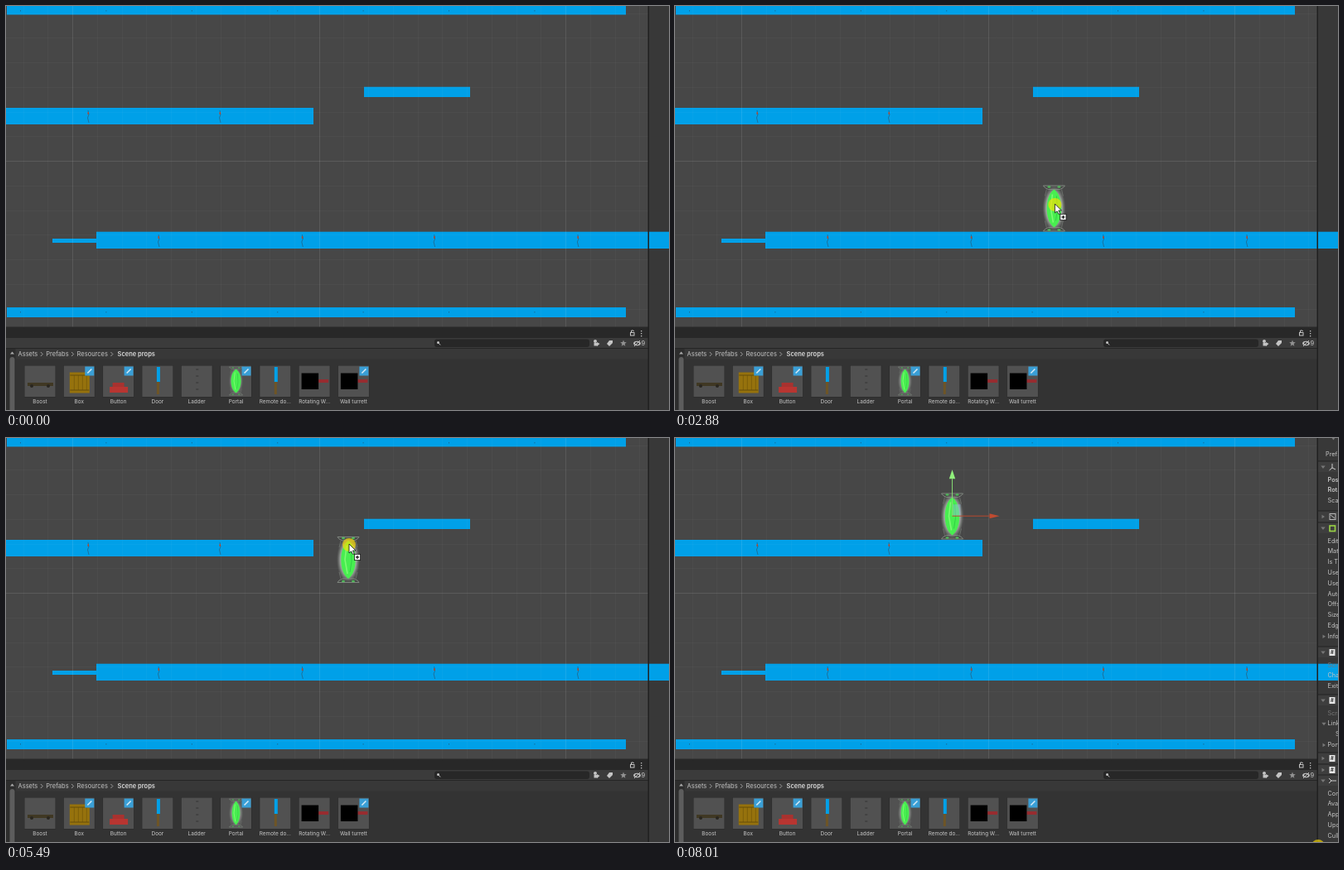
An HTML page with a canvas that plays this animation: 800 by 488 pixels, repeating every 8.09 s.

```html
<!DOCTYPE html>
<html>
<head>
<meta charset="utf-8">
<style>
html, body { margin: 0; width: 100%; height: 100%; overflow: hidden; background: #383838; }
canvas { display: block; }
</style>
</head>
<body>
<canvas id="stage" width="800" height="488"></canvas>
<script>
const ctx = document.getElementById('stage').getContext('2d');
const LOOP = 8090, TICK = 78, DRAG = 850, DROP = 6920;
const CELL = 29.75, SCENE_W = 775, SCENE_H = 388, FLOOR = 244.5;
const BLUE = '#00a0e8', LIGHT = '#c4c4c4';

// Mouse strokes: start and end time, where the cursor arrives, height of the dragged portal.
const START = { x: 675, y: 500, portalY: 500 };
const STROKES = [
  { from: 70, to: 700, x: 283, y: 455 },
  { from: DRAG, to: 1640, x: 323, y: 239, portalY: FLOOR },
  { from: 1710, to: 1790, x: 329, y: 220, portalY: 223 },
  { from: 1940, to: 2100, x: 339, y: 240, portalY: FLOOR },
  { from: 2490, to: 3200, x: 538, y: 240, portalY: FLOOR },
  { from: 3350, to: 3670, x: 488, y: 240, portalY: FLOOR },
  { from: 3820, to: 4380, x: 472, y: 171, portalY: 169 },
  { from: 4460, to: 4620, x: 452, y: 186, portalY: 188 },
  { from: 4700, to: 5090, x: 440, y: 239, portalY: FLOOR },
  { from: 5250, to: 5490, x: 414, y: 129, portalY: 147 },
  { from: 5570, to: 6050, x: 351, y: 56, portalY: 58 },
  { from: 6130, to: 6610, x: 336, y: 93, portalY: 94.5 },
  { from: DROP, to: 7700, x: 776, y: 510 },
  { from: 8010, to: 8010, x: 776, y: 493 }
];

// Each stroke advances in even steps, about one per TICK.
function pose(time) {
  let now = START;
  for (const { from, to, x, y, portalY = y } of STROKES) {
    if (time < from) break;
    const steps = Math.round((to - from) / TICK) + 1;
    const done = Math.floor(1.15 + (time - from) * (steps - 1) / (to - from || 1));
    const p = Math.min(1, done / steps);
    const mix = (a, b) => a + (b - a) * p;
    now = { x: mix(now.x, x), y: mix(now.y, y), portalY: mix(now.portalY, portalY) };
  }
  return now;
}

function rect(x, y, w, h, color) {
  ctx.fillStyle = color;
  ctx.fillRect(x, y, w, h);
}

function frame(x, y, w, h, color, width = 1) {
  ctx.strokeStyle = color;
  ctx.lineWidth = width;
  ctx.strokeRect(x, y, w, h);
}

function pill(x, y, w, h, color) {
  ctx.beginPath();
  ctx.roundRect(x, y, w, h, 3);
  ctx.fillStyle = color;
  ctx.fill();
}

function trace(points) {
  ctx.beginPath();
  for (let i = 0; i < points.length; i += 2) ctx.lineTo(points[i], points[i + 1]);
}

function line(color, width, ...points) {
  trace(points);
  ctx.strokeStyle = color;
  ctx.lineWidth = width;
  ctx.stroke();
}

function poly(color, ...points) {
  trace(points);
  ctx.closePath();
  ctx.fillStyle = color;
  ctx.fill();
}

function ellipse(x, y, rx, ry, color) {
  ctx.beginPath();
  ctx.ellipse(x, y, rx, ry, 0, 0, 7);
  ctx.fillStyle = color;
  ctx.fill();
}

function text(s, x, y, size, { color = LIGHT, weight = 400, align = 'left' } = {}) {
  ctx.font = `${weight} ${size}px Inter, sans-serif`;
  ctx.textAlign = align;
  ctx.textBaseline = 'middle';
  ctx.fillStyle = color;
  ctx.fillText(s, x, y);
}

function foldout(x, y, open) {
  if (open) poly('#777', x - 2.7, y - 1.5, x + 2.7, y - 1.5, x, y + 2);
  else poly('#777', x - 1.5, y - 2.3, x + 2, y, x - 1.5, y + 2.3);
}

function drawPortal(x, y, scale = 1, width = 9, glow = .9) {
  ctx.save();
  ctx.translate(x, y);
  ctx.scale(scale, scale);

  ctx.save();
  ctx.scale(.5, 1);
  const halo = ctx.createRadialGradient(0, 0, 12, 0, 0, 28);
  halo.addColorStop(0, `rgba(225,240,225,${glow})`);
  halo.addColorStop(.5, `rgba(200,212,200,${glow * .65})`);
  halo.addColorStop(1, 'rgba(150,150,150,0)');
  ellipse(0, 0, 28, 28, halo);
  ctx.restore();

  // Ornaments, mirrored to all four corners.
  for (const sy of [-1, 1]) for (const sx of [-1, 1]) {
    ctx.save();
    ctx.scale(sx, sy);
    line('#858d85', .9, 0, 27.5, 13, 27.5, 11, 25, 7, 23, 0, 23);
    line('#727872', .8, 9, 23, 11, 15);
    ellipse(6, 26, 2, 1.2, '#51b85a');
    ctx.restore();
  }

  const bulge = width * 1.3;
  ctx.beginPath();
  ctx.moveTo(0, -23);
  ctx.bezierCurveTo(bulge, -15, bulge, 15, 0, 23);
  ctx.bezierCurveTo(-bulge, 15, -bulge, -15, 0, -23);
  ctx.fillStyle = '#48ee50';
  ctx.fill();
  line('#7dfa72', 1.6, -2, -17, -4, 0, -1, 17);
  line('#2fd044', 1, 3, -15, 4, 2, 2, 15);
  ctx.restore();
}

function drawCrack(x, y) {
  line('#24658a', .8, x, y + 3, x + 1, y + 8, x - .5, y + 12, x + 1, y + 18);
  rect(x - .5, y + 5, 1.5, 3, '#a84a38');
}

function drawScene() {
  rect(0, 0, SCENE_W, SCENE_H, '#474747');
  for (const [y, h] of [[0, 10.5], [364, 12]]) {
    rect(1, y, 747, h, BLUE);
    for (let x = 17; x < 740; x += 103.4) rect(x, y + 5, 1, 1.5, '#176e9c');
  }
  rect(432, 97.7, 128, 12.3, BLUE);
  rect(56, 281, 53, 5, BLUE);
  rect(0, 123, 371, 20, BLUE);
  rect(109, 272.7, SCENE_W, 20.3, BLUE);
  for (let i = 0; i < 2; i++) drawCrack(99 + 159 * i, 123);
  for (let i = 0; i < 4; i++) drawCrack(184 + 166.3 * i + i % 2 * 7, 273);

  const shade = n => `rgba(255,255,255,${n % 10 ? .027 : .1})`;
  for (let n = -2; n < 24; n++) {
    const x = Math.round(80 + n * CELL) + .5;
    line(shade(n), 1, x, 0, x, SCENE_H);
  }
  for (let n = -6; n < 7; n++) {
    const y = Math.round(187 + n * CELL) + .5;
    line(shade(n), 1, 0, y, SCENE_W, y);
  }
}

function drawDoor(x) {
  rect(x - 1, 454, 3, 15, '#6e5526');
  rect(x - 1, 436, 4, 18, BLUE);
}

function drawTurret(x) {
  rect(x + 5, 451, 12, 4, '#972c30');
  rect(x - 15.5, 443.5, 20.5, 19.5, '#000');
}

const PROPS = {
  'Boost'(x) {
    rect(x - 15, 455, 31, 4, '#403823');
    for (const dx of [-10, 10]) ellipse(x + dx, 459, 2, 2, '#29261f');
  },
  'Box'(x) {
    rect(x - 11.5, 442.5, 24, 25, '#96720d');
    for (let dx = -6; dx < 10; dx += 5) line('#7c5e0b', 1, x + dx, 446, x + dx, 464);
    for (const y of [446, 464]) line('#654c08', 1, x - 11, y, x + 12, y);
  },
  'Button'(x) {
    rect(x - 7, 455, 14, 5, '#a8322f');
    rect(x - 10.5, 460, 22, 7, '#b83531');
  },
  'Door': drawDoor,
  'Ladder'(x) {
    for (let y = 438; y < 470; y += 8) rect(x - 1, y, 3, 2, '#424242');
  },
  'Portal'(x, time) {
    drawPortal(x, 453, .62, time < DRAG ? 10 : 8, .5);
  },
  'Remote do...': drawDoor,
  'Rotating W...': drawTurret,
  'Wall turrett': drawTurret
};
const EDITABLE = ['Box', 'Button', 'Portal', 'Wall turrett'];

function drawToolbarIcons() {
  frame(753.5, 394.5, 4.5, 3.5, LIGHT);
  line(LIGHT, 1, 754.5, 394, 754.5, 392, 757, 392, 757.5, 393);
  for (let y = 392; y < 400; y += 3) rect(766, y, 1.3, 1.3, LIGHT);
  ellipse(521.5, 406.5, 1.5, 1.5, LIGHT);
  line(LIGHT, 1, 522.5, 407.5, 524, 409.5);
  ellipse(711, 405, 2, 2, LIGHT);
  rect(709.5, 407, 4, 3.5, LIGHT);
  poly(LIGHT, 713, 406, 716.5, 408, 713, 411);
  poly(LIGHT, 725, 408, 728, 404, 732, 404, 732, 407, 728, 411);
  const star = [];
  for (let i = 0; i < 10; i++) {
    const r = i % 2 ? 1.7 : 4, a = i * Math.PI / 5;
    star.push(745 + r * Math.sin(a), 407.5 - r * Math.cos(a));
  }
  poly('#929292', ...star);
  ellipse(761.5, 407.5, 4.3, 2.8, LIGHT);
  ellipse(761.5, 407.5, 2.5, 1.7, '#3b3b3b');
  line(LIGHT, 1, 758, 411, 765, 404);
  text('9', 766.5, 408, 7.5);
}

function drawProject(time) {
  rect(0, 388, SCENE_W, 100, '#333');
  rect(0, 387.5, SCENE_W, 13.5, '#282828');
  rect(0, 401, SCENE_W, 12.5, '#3b3b3b');
  rect(0, 413, SCENE_W, 13.5, '#383838');
  rect(0, 413, SCENE_W, 1, '#252525');
  rect(0, 414, 11.5, 74, '#2d2d2d');
  poly('#aaa', 5, 420.5, 10, 420.5, 7.5, 417.5);
  pill(4.5, 424, 6, 80, '#5d5d5d');
  pill(517, 402.5, 187, 9.5, '#272727');
  drawToolbarIcons();

  let x = 14.5;
  for (const folder of ['Assets', 'Prefabs', 'Resources']) {
    text(folder, x, 420.5, 7.5);
    x += ctx.measureText(folder).width + 3.5;
    line('#aaa', .9, x, 418, x + 2.5, 420.5, x, 423);
    x += 6.5;
  }
  text('Scene props', 134.5, 420.5, 7.5, { color: '#d8d8d8', weight: 600 });

  Object.entries(PROPS).forEach(([name, drawProp], i) => {
    const x = 41 + i * 47.3;
    rect(x - 19, 434, 38, 38.5, '#2b2b2b');
    rect(x - 18.5, 434.5, 37, 37.5, '#515151');
    drawProp(x, time);
    if (EDITABLE.includes(name)) {
      rect(x + 7, 435.5, 11, 11, '#3a9fd6');
      line('#d5eaf5', 1.6, x + 10, 443.5, x + 15, 438.5);
    }
    text(name, x, 478.5, 6.4, { color: '#c8c8c8', align: 'center' });
  });
}

const HEADER_ICONS = {
  axes(y) {
    line('#ccc', 1, 793, y - 4, 793, y + 1, 797, y + 3);
    line('#ccc', 1, 793, y + 1, 789.5, y + 4);
  },
  sprite(y) {
    frame(790, y - 3.5, 7, 7, '#bbb');
    line('#bbb', 1, 791, y - 2, 796, y + 2);
  },
  collider(y) {
    frame(790, y - 3, 6.5, 6.5, '#9ad444', 1.6);
  },
  script(y) {
    rect(789.5, y - 4, 7, 8, '#e6e6e6');
    text('#', 793, y + .3, 6, { color: '#333', weight: 700, align: 'center' });
  },
  animator(y) {
    line('#ccc', 1, 789, y - 3, 792, y, 789, y + 3);
    line('#ccc', 1, 792, y, 798, y);
  }
};
const SECTIONS = [
  [35, 'axes', 'Position', 'Rotation', 'Scale'],
  [95, 'sprite'],
  [109, 'collider', 'Edit', 'Material', 'Is Trigger', 'Used', 'Used', 'Auto', 'Offset', 'Size', 'Edge', 'Info'],
  [259, 'script', 'Script', 'Channel', 'Exit'],
  [317, 'script', 'Script', 'Link', 'Size', 'Portal'],
  [387, 'script'],
  [401, 'script'],
  [414, 'animator', 'Controller', 'Avatar', 'Apply', 'Update', 'Culling']
];
const FOLDED = ['Info', 'Link', 'Portal'];

function drawInspector() {
  foldout(794.5, .5, true);
  text('Prefab', 785, 19.5, 7.3);
  for (const [top, icon, ...fields] of SECTIONS) {
    rect(776, top - 7, 24, 13, '#3e3e3e');
    rect(776, top - 7.5, 24, 1, '#222');
    foldout(782, top, fields.length > 0);
    HEADER_ICONS[icon](top);
    fields.forEach((name, i) => {
      const y = top + 15.5 + i * 12.8;
      const nested = icon === 'script' && name === 'Size';
      const bold = name === 'Position' || name === 'Rotation';
      text(name, nested ? 797 : 787.5, y, 7.3,
        { color: name === 'Script' ? '#777' : LIGHT, weight: bold ? 600 : 400 });
      if (FOLDED.includes(name)) foldout(783, y, name === 'Link');
    });
  }
}

function drawGizmo(x, y) {
  rect(x + 1, y - 14, 9, 14, 'rgba(150,190,225,.45)');
  line('#83d873', 1, x, y - 45, x, y);
  poly('#91f07c', x - 3.7, y - 45, x + 3.7, y - 45, x, y - 56);
  line('#b8492f', 1, x, y, x + 45, y);
  poly('#c04b30', x + 45, y - 3, x + 45, y + 3, x + 57, y);
}

function drawCursor(x, y, dragging) {
  ellipse(x, y, 8, 8, 'rgba(255,222,0,.65)');
  ctx.save();
  ctx.translate(x, y);
  poly('#fff', 0, -1, 0, 10, 2.6, 7.8, 4.5, 11.5, 6.2, 10.6, 4.4, 7, 8, 7);
  ctx.strokeStyle = '#111';
  ctx.lineWidth = .8;
  ctx.stroke();
  if (dragging) {
    rect(6, 11, 8, 8, '#111');
    rect(6.8, 11.8, 6.4, 6.4, '#fff');
    line('#111', 1.2, 8, 15, 12, 15);
    line('#111', 1.2, 10, 13, 10, 17);
  }
  ctx.restore();
}

function draw(time) {
  const { x, y, portalY } = pose(time);
  const dragging = time >= DRAG && time < DROP;
  rect(0, 0, 800, 488, '#383838');
  drawScene();
  if (time >= DROP) {
    drawPortal(334.5, 94.5);
    drawGizmo(334.5, 94.2);
    drawInspector();
  } else if (dragging && y < SCENE_H) {
    drawPortal(x - 1, portalY);
  }
  drawProject(time);
  rect(774.5, 0, 1.5, 488, '#202020');
  drawCursor(x, y, dragging);
}

const begin = performance.now();
function tick() {
  draw((performance.now() - begin) % LOOP);
  requestAnimationFrame(tick);
}
tick();
</script>
</body>
</html>
```
